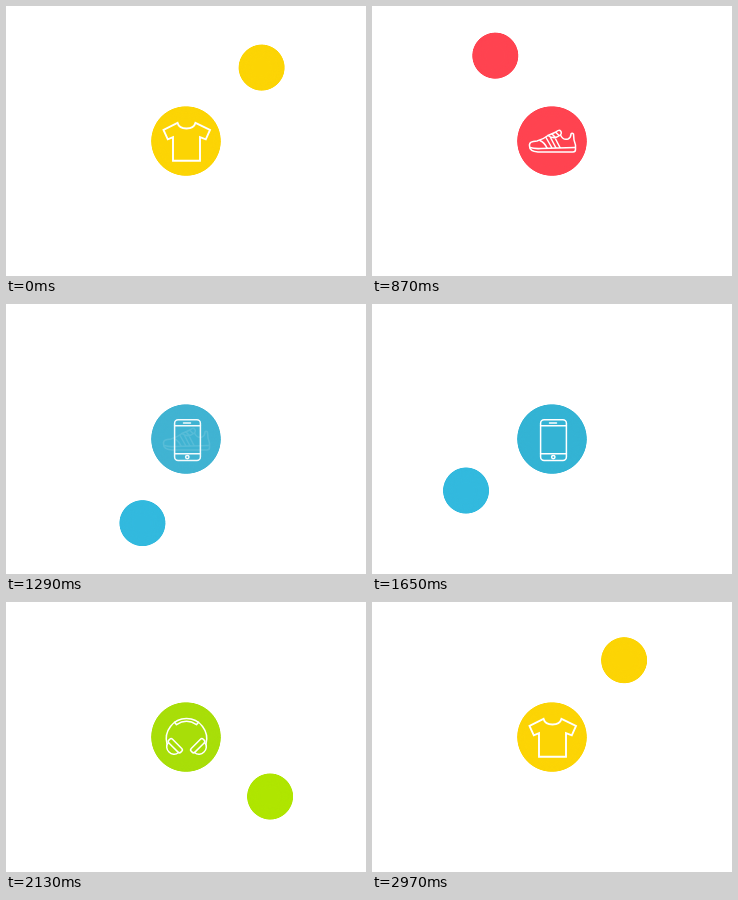
Write an HTML page that moves like this. It is 360 px wide and 270 px high and loops after 3 s.

```html
<!DOCTYPE html>
<html lang="en">
<head>
<meta charset="utf-8">
<title>Orbiting icons</title>
<style>
  html, body { margin: 0; width: 100%; height: 100%; overflow: hidden; background: #fff; }
  svg { display: block; width: 360px; height: 270px; }
  .icon { fill: none; stroke: #fff; stroke-width: 1.5; stroke-linejoin: round; stroke-linecap: round; }
</style>
</head>
<body>
<svg viewBox="0 0 360 270">
  <defs>
    <filter id="goo" filterUnits="userSpaceOnUse" x="0" y="0" width="360" height="270" color-interpolation-filters="sRGB">
      <feGaussianBlur stdDeviation="6"/>
      <feColorMatrix values="1 0 0 0 0  0 1 0 0 0  0 0 1 0 0  0 0 0 20 -8.5"/>
    </filter>
    <g id="cup" transform="translate(169.3 143.7) rotate(45)">
      <rect x="-8.5" y="-2.6" width="17" height="5.2" rx="2"/>
      <path d="M-7 2.6C-7 11 7 11 7 2.6"/>
    </g>
  </defs>
  <g filter="url(#goo)">
    <ellipse class="moon"/><ellipse class="moon"/><ellipse class="moon"/><ellipse class="moon"/>
    <ellipse id="hub" cx="180" cy="135"/>
  </g>
  <!-- shoe -->
  <g class="icon">
    <path d="M157.5 140C157 136 160 135.500 165 135Q171 133.500 176 129.500L184 126Q187 123 189 125.500Q190 127 188.500 129Q191 134.500 196 133Q199 131.500 199 128Q200 126.500 201.500 128Q201.500 134 203.500 139V143.500Q203.500 146 201 146H166Q157.500 145.500 157.500 140Z"/>
    <path d="M158 141.500Q163 143 169 142.500L203 141.500M168 134.500Q173 137 175 142M174 131.500L180 142M178 130.500L184 142M182 130L188 141.500M176 129.500Q182 134 188.500 129M180 128L183 131M184 126.500L187 129.500"/>
  </g>
  <!-- phone -->
  <g class="icon">
    <rect x="168.600" y="115.800" width="25.800" height="40.600" rx="3.500"/>
    <path d="M168.600 121.700H194.400M168.600 149.800H194.400M177.500 118.900H184.500"/>
    <circle cx="181.300" cy="153.100" r="1.700"/>
  </g>
  <!-- headphones -->
  <g class="icon">
    <path d="M161 142A20.200 20.200 0 1 1 200 142M168.500 120L170.500 122.700Q180.500 116 190.500 122.700L192.500 120"/>
    <use href="#cup"/>
    <use href="#cup" transform="matrix(-1 0 0 1 361 0)"/>
  </g>
  <!-- shirt -->
  <path class="icon" style="stroke-width:1.9;stroke-linejoin:miter" d="M171.500 116.800Q173 122.500 180.500 122.500Q188 122.500 189.500 116.800L204 124L199.800 133.300L194 131.200V154.800H167V131.200L161.800 133.300L157.500 124Z"/>
</svg>
<script>
const LOOP = 3000, STEP = 750;
const moonColors = [[255, 67, 80], [50, 185, 222], [175, 229, 0], [252, 212, 4]];
const hubColors = [[255, 67, 80], [51, 179, 212], [168, 222, 8], [252, 212, 4]];
const white = [255, 255, 255];
const moons = document.querySelectorAll(".moon");
const icons = document.querySelectorAll(".icon");
const hub = document.getElementById("hub");

const clamp = x => Math.max(0, Math.min(1, x));
const ease = x => { x = clamp(x); return x * x * (3 - 2 * x); };
const mix = (a, b, k) => a.map((v, i) => v + (b[i] - v) * k);
const rgb = c => `rgb(${c.map(Math.round)})`;
const fade = u => ease((u - 320) / 260);
const set = (el, attrs) => { for (const k in attrs) el.setAttribute(k, attrs[k]); };

// Leaves the hub, swings a quarter turn clockwise and falls back in.
function drawMoon(i, u) {
  const el = moons[i];
  const shown = u > 250 && u < 1240;
  el.style.display = shown ? "" : "none";
  if (!shown) return;
  const dist = 105.4 * (1 - Math.abs((u - 745) / 495) ** 2.6);
  const deg = 180 - 90 * i + 45.4 + 0.088 * (u - 745);
  const a = deg * Math.PI / 180;
  const r = Math.min(23, 14 + (u - 330) * 0.043);
  const stretch = 0.05 * clamp((530 - u) / 80);
  const x = 180 + dist * Math.cos(a), y = 135 + dist * Math.sin(a);
  const next = moonColors[(i + 1) % 4];
  set(el, {
    cx: x, cy: y, rx: r * (1 + stretch), ry: r * (1 - stretch),
    transform: `rotate(${deg} ${x} ${y})`,
    fill: rgb(mix(moonColors[i], next, 0.25 * ease((u - 1100) / 100)))
  });
}

function drawHub(t) {
  const phase = t % STEP, i = Math.floor(t / STEP), k = fade(phase);
  const under = mix(hubColors[(i + 3) % 4], white, 0.65 * k);
  const bulge = 5 * Math.exp(-(((phase - 375) / 48) ** 2));
  const sideways = i % 2;
  set(hub, {
    rx: 34.6 + (sideways ? bulge : 0),
    ry: 34.6 + (sideways ? 0 : bulge),
    fill: rgb(mix(under, hubColors[i], k))
  });
  icons.forEach((el, n) => {
    el.style.opacity = n === i ? k : n === (i + 3) % 4 ? 1 - k * k : 0;
  });
}

function draw(now) {
  const t = now % LOOP;
  for (let i = 0; i < 4; i++) drawMoon(i, (t - i * STEP + LOOP) % LOOP);
  drawHub(t);
}

let start;
function tick(now) {
  start ??= now;
  draw(now - start);
  requestAnimationFrame(tick);
}
draw(0);
requestAnimationFrame(tick);
</script>
</body>
</html>
```
